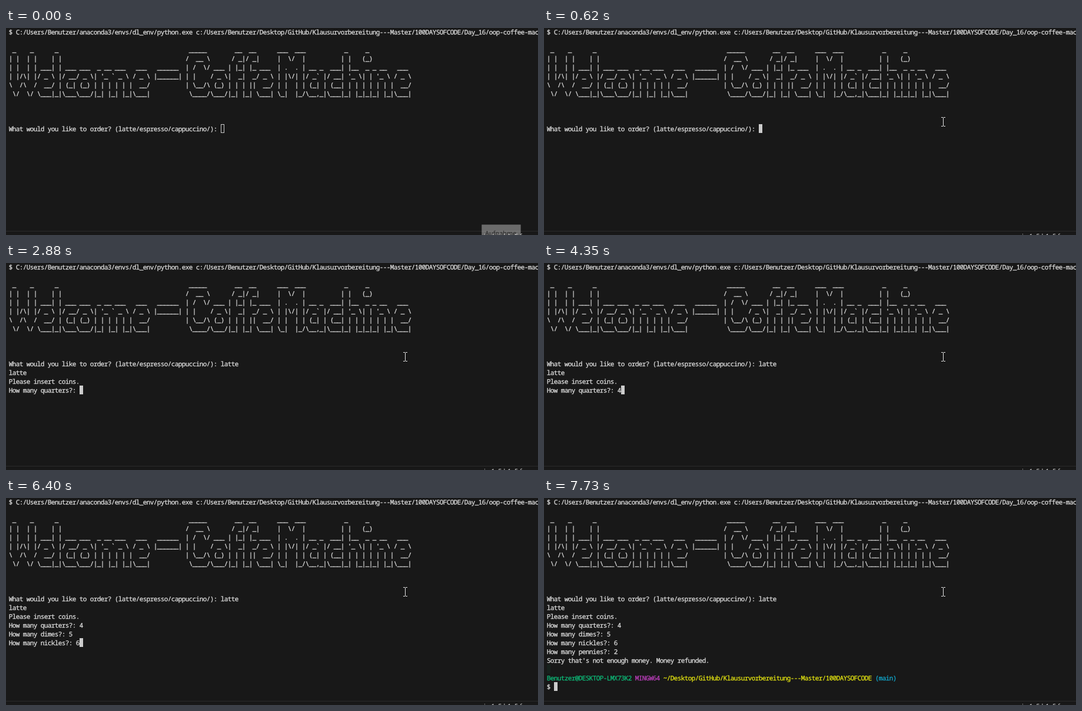
Animation of 904x353 px, one loop 8 s. Source, as an HTML page:

```html
<!DOCTYPE html>
<html lang="en">
<head>
<meta charset="utf-8">
<title>Coffee machine terminal</title>
<style>
  html, body { margin: 0; width: 100%; height: 100%; overflow: hidden; background: #181818; }
  svg { display: block; width: 904px; height: 353px; }
  text {
    white-space: pre; color: #dcdcdc; fill: currentColor; stroke: currentColor; stroke-width: .3px;
    font: 11px "Noto Sans Mono", monospace; letter-spacing: -.6px; text-rendering: geometricPrecision;
  }
  tspan { fill: currentColor; stroke: currentColor; }
  .ui { font: 11px "Open Sans", sans-serif; letter-spacing: 0; stroke: none; }
  .dark { color: #222; }
  .user { color: #0dbc79; }
  .shell { color: #bc3fbc; }
  .path { color: #e5e510; }
  .branch { color: #11a8cd; }
  #tip { animation: fade 8s step-end infinite; }
  @keyframes fade {
    0% { opacity: 1; }
    .875% { opacity: .5; }
    1.75%, 100% { opacity: 0; }
  }
</style>
</head>
<body>
<template data-col="0">
 _    _      _
| |  | |    | |
| |  | | ___| | ___ ___  _ __ ___   ___
| |/\| |/ _ \ |/ __/ _ \| '_ ` _ \ / _ \
\  /\  /  __/ | (_| (_) | | | | | |  __/
 \/  \/ \___|_|\___\___/|_| |_| |_|\___|
</template>
<template data-col="41">


 ______
|______|
</template>
<template data-col="50">
 _____        __  __
/  __ \      / _|/ _|
| /  \/ ___ | |_| |_ ___
| |    / _ \|  _|  _/ _ \
| \__/\ (_) | | | ||  __/
 \____/\___/|_| |_| \___|
</template>
<template data-col="76">
___  ___           _     _
|  \/  |          | |   (_)
| .  . | __ _  ___| |__  _ _ __   ___
| |\/| |/ _` |/ __| '_ \| | '_ \ / _ \
| |  | | (_| | (__| | | | | | | |  __/
\_|  |_/\__,_|\___|_| |_|_|_| |_|\___|
</template>

<svg id="stage" xmlns="http://www.w3.org/2000/svg">
  <rect y="346" width="904" height="1" fill="#2b2b2b"/>
  <text class="ui" x="812" y="358.5">in 1, 5 h1, 5 fs</text>
  <g id="tip">
    <rect x="808.5" y="335.5" width="66" height="20" fill="#fff" fill-opacity=".36" stroke="#fff" stroke-opacity=".08"/>
    <text class="ui dark" x="814" y="354">Aufnahme</text>
  </g>
  <g id="prompt">
    <rect x="5" y="284" width="6" height="15" fill="#17211d"/>
    <text x="4.7" y="311"><tspan class="user">Benutzer@DESKTOP-LMX73K2</tspan> <tspan class="shell">MINGW64</tspan> <tspan class="path">~/Desktop/GitHub/Klausurvorbereitung---Master/100DAYSOFCODE</tspan> <tspan class="branch">(main)</tspan></text>
  </g>
  <rect id="caret" width="5" height="14" stroke="#ccc"/>
  <path id="mouse" d="M-3-8h3v1h-3zM1-8h3v1h-3zM0-7h1v14h-1zM-3 7h3v1h-3zM1 7h3v1h-3z" fill="#e7e7e7" shape-rendering="crispEdges"/>
</svg>

<script>
const LOOP = 8000, LEFT = 5, CELL = 6, LINE = 15, FIRST = 11;
const FOCUS = 620, DONE = 7730;

// [time, text appended to the terminal]
const output = [
  [0, "What would you like to order? (latte/espresso/cappuccino/): "],
  [2340, "l"], [2410, "a"], [2550, "t"], [2620, "t"], [2750, "e"],
  [2880, "\nlatte\nPlease insert coins.\nHow many quarters?: "],
  [4350, "4"], [4550, "\nHow many dimes?: "],
  [5280, "5"], [5680, "\nHow many nickles?: "],
  [6400, "6"], [6730, "\nHow many pennies?: "],
  [7330, "2"], [7660, "\nSorry that's not enough money. Money refunded.\n"],
  [DONE, "\n\n$ "]
];

// [time, x, y]
const moves = [
  [0, -50, -50], [70, 846, 300], [140, 770, 225], [210, 712, 178],
  [280, 687, 162], [350, 689, 163], [490, 692, 157], [560, 678, 160]
];

const $ = id => document.getElementById(id);
const stage = $("stage"), caret = $("caret"), mouse = $("mouse"), prompt = $("prompt");

function addText(row, col, text = "") {
  const el = document.createElementNS(stage.namespaceURI, "text");
  el.setAttribute("x", LEFT - .3 + col * CELL);
  el.setAttribute("y", 11 + row * LINE);
  el.textContent = text;
  stage.insertBefore(el, caret);
  return el;
}

addText(0, 0, "$ C:/Users/Benutzer/anaconda3/envs/dl_env/python.exe c:/Users/Benutzer/Desktop/GitHub/Klausurvorbereitung---Master/100DAYSOFCODE/Day_16/oop-coffee-machine");

for (const art of document.querySelectorAll("template")) {
  art.content.textContent.split("\n").forEach((line, i) => {
    if (line) addText(i + 1, +art.dataset.col, line);
  });
}

const rows = Array.from({ length: 11 }, (_, i) => addText(FIRST + i, 0));

function draw(t) {
  const lines = output.filter(e => e[0] <= t).map(e => e[1]).join("").split("\n");
  rows.forEach((el, i) => {
    const line = lines[i] || "";
    if (el.textContent !== line) el.textContent = line;
  });

  const last = lines.length - 1;
  caret.setAttribute("x", LEFT + lines[last].length * CELL + .5);
  caret.setAttribute("y", (FIRST + last) * LINE - .5);
  caret.setAttribute("fill", t < FOCUS ? "none" : "#ccc");

  const [, x, y] = moves.filter(e => e[0] <= t).pop();
  mouse.setAttribute("transform", `translate(${x} ${y})`);
  prompt.setAttribute("visibility", t < DONE ? "hidden" : "visible");
}

const start = performance.now();
function tick() {
  draw((performance.now() - start) % LOOP);
  requestAnimationFrame(tick);
}
tick();
</script>
</body>
</html>
```
